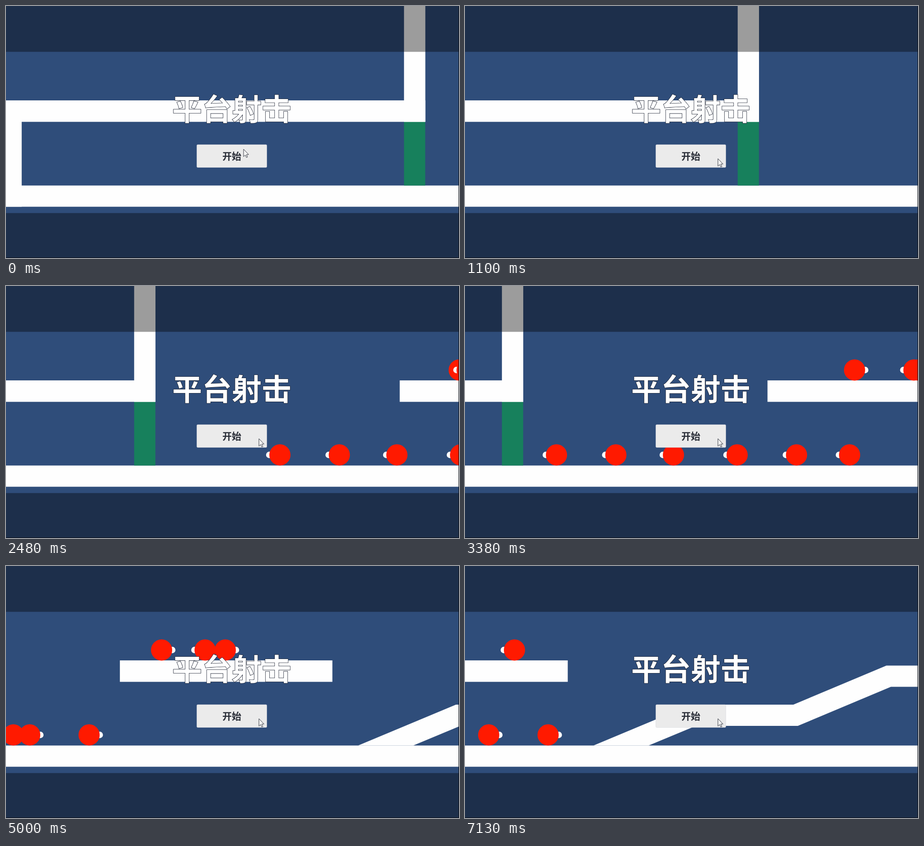
These frames come from a looping animation (1003 px wide and 558 px high, 7.16 s). An HTML page:

```html
<!DOCTYPE html>
<html lang="zh">
<head>
<meta charset="utf-8">
<title>平台射击</title>
<style>
  html, body { margin: 0; width: 100%; height: 100%; overflow: hidden; background: #2f4d7a; }
  svg { display: block; width: 100vw; height: 100vh; }
  text { font-family: "Noto Sans CJK SC", "Noto Sans CJK", sans-serif; font-weight: 700; text-anchor: middle; }
</style>
</head>
<body>
<svg viewBox="0 0 1003 558" preserveAspectRatio="none">
  <rect width="1003" height="558" fill="#2f4d7a"/>
  <rect y="397.5" width="1003" height="47" fill="#fefefe"/>

  <!-- Level, measured from the left side of the pillar -->
  <g id="world">
    <rect y="256" width="47" height="141.5" fill="#17805c"/>
    <g fill="#fefefe">
      <rect y="-5" width="47.2" height="261.5"/>
      <rect x="-1200" y="209" width="1247.2" height="47.5"/>
      <rect x="-1200" y="209" width="353.5" height="235.5"/>
      <rect x="588" y="209" width="470.5" height="47.5"/>
      <path d="M1115.5 397.5L1332 307H1558L1764 220.5H2400V267.5H1774L1568 354H1342L1237.5 397.5Z"/>
    </g>
    <g id="enemies"></g>
  </g>

  <path d="M0 0H1003V101.5H0ZM0 458.5H1003V558H0Z" fill="#000" fill-opacity=".39"/>

  <text x="500" y="253" font-size="66" fill="#fff" stroke="#1a2030" stroke-width="1.6" paint-order="stroke">平台射击</text>
  <rect x="422.5" y="307" width="155" height="50.5" rx="2" fill="#ebebeb" stroke="#d3d5dc" stroke-width=".6"/>
  <text x="500" y="340.3" font-size="21" fill="#282c36">开始</text>

  <path id="cursor" d="M0 0V16.5L3.8 13L6.3 18.5L8.8 17.4L6.4 12H11.3Z" fill="#f4f4f4" stroke="#30343f"/>
  <path d="M1002.5 0V557.5H0" fill="none" stroke="#080c14"/>
</svg>
<script>
const LOOP = 7160;
const RADIUS = 23.5;

// Time in ms and screen x of the pillar
const CAMERA = [
  [0, 881.5], [1100, 604], [1450, 522], [2210, 355], [2480, 284],
  [2930, 165.5], [3380, 82], [3620, 23], [4280, -153.5], [4430, -193.5],
  [5140, -370.5], [5920, -539.5], [6010, -563], [6640, -728], [7130, -831]
];
const CURSOR = { from: [526, 317], to: [560, 338], start: 30, end: 500 };

const FLOOR = { y: 374, left: 111.5, span: 4000 };
const LEDGE = { y: 186, left: 658, span: 329.5 };

const byId = id => document.getElementById(id);
const world = byId("world"), cursor = byId("cursor");

function make(tag, attrs, parent) {
  const node = document.createElementNS("http://www.w3.org/2000/svg", tag);
  for (const key in attrs) node.setAttribute(key, attrs[key]);
  return parent.appendChild(node);
}

// turn: camera travel at which the enemy reaches the left end of its patrol
function makeEnemy(track, turn) {
  const group = make("g", {}, byId("enemies"));
  const gun = make("circle", { r: 7.2, fill: "#fefefe" }, group);
  make("circle", { r: RADIUS, fill: "#ff1a00" }, group);
  return { track, turn, group, gun };
}

const enemies = [
  ...[39, 170.5, 298, 439, 570.5, 688].map(k => makeEnemy(FLOOR, k - 111.5)),
  ...[-486.5, -345.5, -204.5].map(turn => makeEnemy(LEDGE, turn))
];

function cameraAt(t) {
  const i = CAMERA.findIndex(point => point[0] > t);
  if (i < 0) return CAMERA[CAMERA.length - 1][1];
  const [t0, x0] = CAMERA[i - 1], [t1, x1] = CAMERA[i];
  return x0 + (x1 - x0) * (t - t0) / (t1 - t0);
}

// Enemies pace back and forth at the speed of the camera
function placeEnemy({ track, turn, group, gun }, travel) {
  const { y, left, span } = track;
  const period = 2 * span;
  const phase = (((travel - turn) % period) + period) % period;
  const goesRight = phase < span;
  const x = left + (goesRight ? phase : period - phase);
  group.setAttribute("transform", `translate(${x} ${y})`);
  gun.setAttribute("cx", goesRight ? RADIUS : -RADIUS);
}

function placeCursor(t) {
  const { from, to, start, end } = CURSOR;
  const p = Math.min(1, Math.max(0, (t - start) / (end - start)));
  const ease = p * p * (3 - 2 * p);
  const [x, y] = from.map((v, i) => v + (to[i] - v) * ease);
  cursor.setAttribute("transform", `translate(${x} ${y})`);
}

function draw(t) {
  const x = cameraAt(t);
  world.setAttribute("transform", `translate(${x} 0)`);
  enemies.forEach(enemy => placeEnemy(enemy, -x));
  placeCursor(t);
}

const begin = performance.now();
function tick() {
  draw((performance.now() - begin) % LOOP);
  requestAnimationFrame(tick);
}
tick();
</script>
</body>
</html>
```
